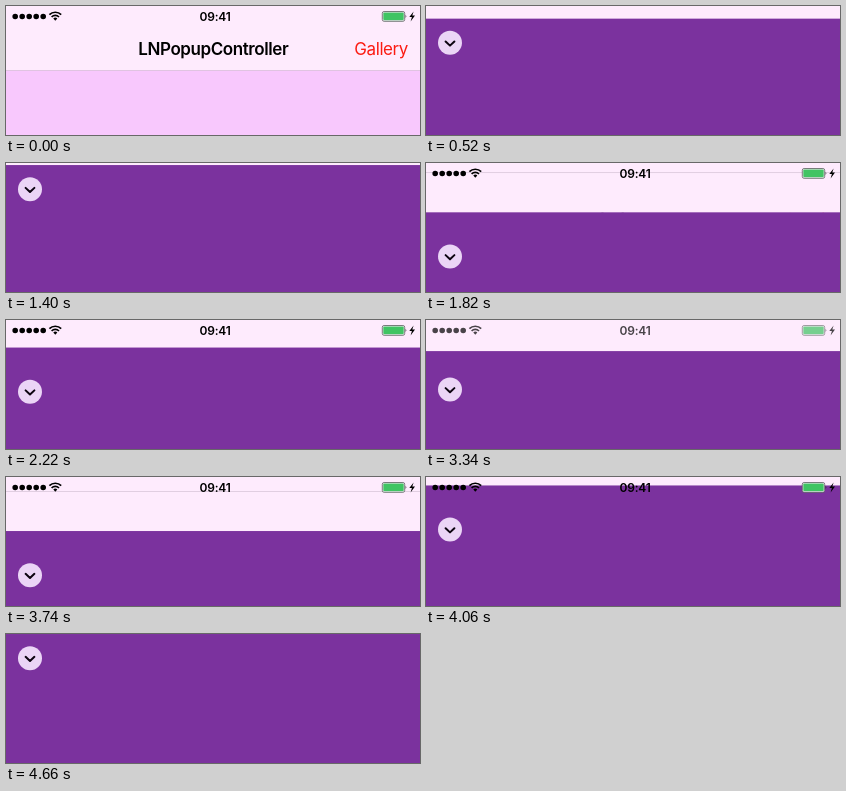
Recreate the animation shown at these times as an HTML page. Size 414 by 129 pixels, loop 4680 ms.

```html
<!DOCTYPE html>
<html lang="en">
<head>
<meta charset="utf-8">
<title>Popup sheet</title>
<style>
  html, body { margin: 0; width: 100%; height: 100%; overflow: hidden; background: #f8c8fd; }
  svg { display: block; width: 414px; height: 129px; }
  text { font-family: Inter, "Liberation Sans", sans-serif; }
  .title { font-size: 17px; font-weight: 600; letter-spacing: -.41px; }
  .link { font-size: 17px; letter-spacing: -.41px; fill: #fb1b12; }
  .clock { font-size: 12px; font-weight: 600; letter-spacing: -.2px; }
  .bar { fill: #feebfd; }
  .hairline { fill: #d6c3d6; }
</style>
</head>
<body>
<svg viewBox="0 0 414 129">
  <rect width="414" height="129" fill="#f8c8fd"/>
  <rect class="bar" width="414" height="64"/>
  <rect class="hairline" y="64" width="414" height=".7"/>
  <text class="title" x="207.3" y="48.5" text-anchor="middle">LNPopupController</text>
  <text class="link" x="402" y="48.5" text-anchor="end">Gallery</text>

  <g id="sheet">
    <rect class="bar" y="-40" width="414" height="40.5"/>
    <rect class="hairline" y="-40" width="414" height=".7"/>
    <rect width="414" height="736" fill="#7b329e"/>
    <g id="close">
      <circle cx="24" r="12" fill="#ebd5f6"/>
      <path d="M19.6 -1.4L24 2.8L28.4 -1.4" fill="none" stroke="#0c0410" stroke-width="2"
            stroke-linecap="round" stroke-linejoin="round"/>
    </g>
  </g>

  <g id="status">
    <path d="M9.2 10.5h28.2" stroke="#000" stroke-width="5.6" stroke-linecap="round" stroke-dasharray="0 7"/>
    <g fill="none" stroke="#000" stroke-width="1.7">
      <path d="M43.4 8.7a8.3 8.3 0 0 1 11.8 0"/>
      <path d="M45.6 11a5.2 5.2 0 0 1 7.4 0"/>
    </g>
    <path d="M47.3 12.6a2.8 2.8 0 0 1 4 0L49.3 14.8z"/>
    <text class="clock" x="209" y="14.8" text-anchor="middle">09:41</text>
    <rect x="376.3" y="5.5" width="22.4" height="9.8" rx="1.8" fill="#feebfd" stroke="#55605a" stroke-width=".8"/>
    <rect x="377.3" y="6.5" width="20.4" height="7.8" rx="1" fill="#40c463"/>
    <path d="M399.6 8.8q1.6 1.6 0 3.2z" fill="#222"/>
    <path d="M407.6 5.5L403.3 11h2.6L404.6 15.4L409 9.6h-2.7z"/>
  </g>
</svg>
<script>
  const LOOP = 4680;
  const CLOSED_TOP = 692;
  const STIFFNESS = 0.0114;

  // Finger drags as [time, sheet top]; the sheet springs back after the last point.
  const drags = [
    [[1120, 0], [1300, .6], [1400, 2], [1450, 5], [1490, 10], [1640, 32],
     [1750, 44], [1870, 53], [1980, 58.5], [2062, 60]],
    [[3040, 0], [3120, 2.5], [3180, 10], [3260, 23], [3380, 35], [3500, 44],
     [3640, 51.5], [3740, 54], [3768, 55]]
  ];

  // Status bar changes: [start, opacity to reach].
  const statusSteps = [[10, 0], [1490, 1], [2354, 0], [3180, 1], [4053, 0]];
  const STATUS_TIME = 250;

  const sheet = document.getElementById('sheet');
  const close = document.getElementById('close');
  const status = document.getElementById('status');

  function spring(from, elapsed) {
    const p = STIFFNESS * elapsed;
    return from * (1 + p) * Math.exp(-p);
  }

  function alongDrag(points, t) {
    const next = points.findIndex(([time]) => time > t);
    if (next < 0) {
      const [time, top] = points[points.length - 1];
      return spring(top, t - time);
    }
    const [t0, y0] = points[next - 1], [t1, y1] = points[next];
    return y0 + (y1 - y0) * (t - t0) / (t1 - t0);
  }

  function sheetTop(t) {
    const drag = drags.filter(points => t >= points[0][0]).pop();
    return drag ? alongDrag(drag, t) : spring(CLOSED_TOP, t);
  }

  function statusLevel(t) {
    const step = statusSteps.filter(([start]) => t >= start).pop();
    if (!step) return 1;
    const p = Math.min(1, (t - step[0]) / STATUS_TIME);
    const eased = p * p * (3 - 2 * p);
    return step[1] ? eased : 1 - eased;
  }

  function draw(now) {
    const t = now % LOOP;
    const level = statusLevel(t);
    sheet.setAttribute('transform', `translate(0 ${sheetTop(t).toFixed(2)})`);
    close.setAttribute('transform', `translate(0 ${(24.2 + 20 * level).toFixed(2)})`);
    status.setAttribute('opacity', level.toFixed(3));
  }

  const begin = performance.now();
  function tick() {
    draw(performance.now() - begin);
    requestAnimationFrame(tick);
  }
  tick();
</script>
</body>
</html>
```
